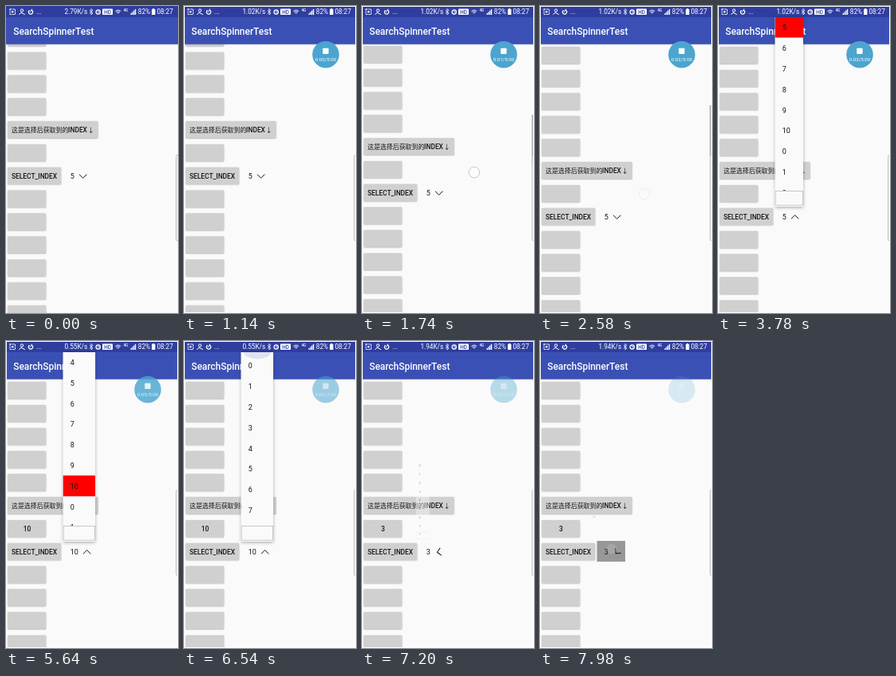
These frames come from a looping animation (216 px wide and 384 px high, 8 s). An HTML page with a canvas:

```html
<!DOCTYPE html>
<html lang="en">
<head>
<meta charset="utf-8">
<title>Spinner demo</title>
<style>
  html, body { margin: 0; width: 100%; height: 100%; overflow: hidden; background: #fafafa; }
  canvas { display: block; width: 216px; height: 384px; }
</style>
</head>
<body>
<canvas id="stage"></canvas>
<script>
const W = 216, H = 384, LOOP = 8000, OPEN_MS = 400;
const canvas = document.getElementById('stage');
const ctx = canvas.getContext('2d');
const ratio = Math.max(1, window.devicePixelRatio || 1);
canvas.width = W * ratio;
canvas.height = H * ratio;

const SANS = 'Roboto, "Noto Sans CJK SC", "Noto Sans CJK", sans-serif';
const CJK = '"Noto Sans CJK SC", "Noto Sans CJK", sans-serif';
const INK = '#141414';
const ROW = 28.8, ITEM = 25.8, FIRST_ITEM = 31;

// [time, value] steps, linear in between
const pageScroll = [[1260, 51], [1500, 42], [1740, 30], [2100, 12], [2440, 0]];
const dragX = [[1260, 147], [1740, 141], [2440, 131]];
const dragY = [[1260, 187], [1740, 208], [2440, 235]];
const dragAlpha = [[1180, 0], [1260, 1], [2440, 1], [2640, 0]];
const barAlpha = [[1240, 0], [1300, 1], [2700, 1], [2950, 0]];
const recorderAlpha = [[5160, 1], [5640, .82], [6540, .53], [7980, .2]];
const glowAlpha = [[6240, 0], [6400, 1], [6560, .9], [6860, 0]];
const secondList = [[5200, 262], [5400, 195], [5640, 107.7], [5900, 45], [6240, 0]];

// every time the drop-down is shown
const sessions = [
  { open: 2990, close: 3800, value: 5, pick: 10, scroll: () => 5 * ITEM + 4 },
  { open: 4704, close: 6980, value: 10, pick: 3, scroll: t => at(secondList, t) },
  { open: 7892, close: 9000, value: 3, pick: 3, scroll: () => 3 * ITEM + 4 }
];

const clamp = x => Math.min(1, Math.max(0, x));
const smooth = x => (1 - Math.cos(Math.PI * x)) / 2;

function at(steps, t) {
  if (t <= steps[0][0]) return steps[0][1];
  for (let i = 1; i < steps.length; i++) {
    const [t0, a] = steps[i - 1], [t1, b] = steps[i];
    if (t < t1) return a + (b - a) * (t - t0) / (t1 - t0);
  }
  return steps[steps.length - 1][1];
}

function layer(draw, alpha = 1) {
  if (alpha <= 0) return;
  ctx.save();
  ctx.globalAlpha *= alpha;
  draw();
  ctx.restore();
}

function text(str, x, y, size, color, { weight = 400, align = 'left', family = SANS } = {}) {
  ctx.font = `${weight} ${size}px ${family}`;
  ctx.textAlign = align;
  ctx.textBaseline = 'alphabetic';
  ctx.fillStyle = color;
  ctx.fillText(str, x, y);
}

function rect(x, y, w, h, color, r = 0) {
  ctx.fillStyle = color;
  ctx.beginPath();
  ctx.roundRect(x, y, w, h, r);
  ctx.fill();
}

function disc(x, y, r, color) {
  ctx.fillStyle = color;
  ctx.beginPath();
  ctx.arc(x, y, r, 0, 7);
  ctx.fill();
}

function line(points, color = '#fff', width = 1) {
  ctx.strokeStyle = color;
  ctx.lineWidth = width;
  ctx.beginPath();
  points.forEach(([x, y]) => ctx.lineTo(x, y));
  ctx.stroke();
}

function ring(x, y, r, color = '#fff', width = 1, from = 0, to = 7) {
  ctx.strokeStyle = color;
  ctx.lineWidth = width;
  ctx.beginPath();
  ctx.arc(x, y, r, from, to);
  ctx.stroke();
}

function shadow(blur, dy, opacity) {
  ctx.shadowBlur = blur * ratio;
  ctx.shadowOffsetY = dy * ratio;
  ctx.shadowColor = `rgba(0,0,0,${opacity})`;
}

function button(y, w = 48) {
  layer(() => {
    shadow(1.6, .5, .28);
    rect(2.2, y - 10.8, w, 21.4, '#d0d0d0', 1.2);
  });
}

function textWidth(value) {
  ctx.font = `400 9px ${SANS}`;
  return ctx.measureText(value).width;
}

function spinner(y, value, turn, pressed) {
  const w = textWidth(value);
  if (pressed) rect(71.5, y - 13.5, w + 30.5, 26, '#979797');
  text(value, 80.8, y + 3.3, 9, INK);
  layer(() => {
    ctx.translate(81 + w + 10.6, y + .4);
    ctx.rotate(Math.PI * turn);
    line([[-4.7, -2.3], [0, 2.3], [4.7, -2.3]], INK);
  });
}

function rows(t, state) {
  const top = 61.9 - at(pageScroll, t);
  for (let i = 0; i < 14; i++) {
    const y = top + i * ROW;
    const label = y + 3.3;
    button(y, i === 5 ? 113.4 : i === 7 ? 67 : 48);
    if (i === 5) {
      text('这是选择后获取到的', 7, label, 7.95, INK, { weight: 500, family: CJK });
      text('INDEX', 78.1, label, 8.4, INK, { weight: 500 });
      text('↓', 102.7, label, 8, INK, { weight: 500, family: CJK });
    }
    if (i === 6 && state.result !== '') {
      text(state.result, 26.5, label, 8.4, INK, { weight: 500, align: 'center' });
    }
    if (i === 7) {
      text('SELECT_INDEX', 7, label, 8.4, INK, { weight: 500 });
      spinner(y, state.value, state.turn, state.pressed);
    }
  }
}

function statusIcons() {
  ctx.lineCap = 'round';
  ctx.strokeStyle = '#fff';
  ctx.lineWidth = .9;
  ctx.setLineDash([2, 1.5]);
  ctx.strokeRect(5, 4, 6.5, 6.5);
  ctx.setLineDash([]);
  disc(8.2, 7.2, 1.3, '#fff');
  ring(20, 5.6, 1.7);
  line([[16.5, 10.5], [19, 8.3], [23.5, 10.5]]);
  ring(31, 7.5, 2.6, '#fff', 1.2, -1, 4);
  line([[30.5, 7.5], [32.5, 4]]);
  text('...', 38, 10, 8.2, '#fff');
  line([[105, 5.3], [109, 9], [107, 11], [107, 3.5], [109, 5.5], [105, 9.2]], '#fff', .8);
  ring(115.7, 7.4, 2.6, '#fff', 1.3);
  line([[115.7, 6], [115.7, 7.6], [117, 7.6]], '#fff', .7);
  rect(121, 3.5, 13, 7.5, '#fff', .8);
  text('HD', 127.5, 9.7, 6.3, '#303f9f', { weight: 500, align: 'center' });
  for (const r of [1.2, 3, 4.8]) ring(140.8, 9.8, r, '#fff', .9, 4, 5.4);
  text('4G', 147.5, 7.3, 4.6, '#fff', { weight: 500 });
  for (let i = 0; i < 4; i++) rect(156.5 + i * 1.8, 9 - i * 1.7, 1.3, 2 + i * 1.7, '#fff');
  rect(183, 4, 4.4, 7, '#fff', .5);
  rect(184.2, 3, 2, 1, '#fff');
}

function bars(t) {
  layer(() => {
    shadow(2, .6, .3);
    rect(0, 14, W, 33.7, '#3b50b4');
  });
  rect(0, 0, W, 14, '#2f3e9e');
  const speed = t < 1100 ? '2.79' : t < 4100 ? '1.02' : t < 7100 ? '0.55' : '1.94';
  text(speed + 'K/s', 102.2, 10.1, 8.2, '#fff', { align: 'right' });
  layer(statusIcons);
  text('82%', 165.8, 10.1, 8.2, '#fff');
  text('08:27', 209.8, 10.1, 8.2, '#fff', { align: 'right' });
  text('SearchSpinnerTest', 9.2, 35.8, 11.95, '#fff', { weight: 500 });
}

function edgeHandle() {
  rect(213.6, 186, 6, 108, '#f0f0f0', 2.5);
  ctx.strokeStyle = '#a8a8a8';
  ctx.lineWidth = .7;
  ctx.stroke();
}

function recorder(t) {
  if (t < 120) return;
  layer(() => {
    disc(178, 60.7, 16.8, '#4ba5cf');
    rect(174.2, 52.8, 7.4, 7.2, '#fff', .8);
    const seconds = Math.max(0, Math.floor((t - 350) / 1000));
    text(`0:0${seconds}/5:00`, 178, 68.8, 6.2, '#fff', { align: 'center' });
  }, at(recorderAlpha, t));
}

function popup(t, state) {
  const { session, shown } = state;
  if (!session || shown <= 0) return;
  const w = textWidth(session.value) + 30.5;
  layer(() => {
    ctx.translate(65, 245.5);
    ctx.scale(shown, shown);
    ctx.translate(-65, -245.5);
    layer(() => {
      // the elevation shadow only builds up as the panel becomes opaque
      shadow(4 * shown, .6 * shown, .35 * shown ** 4);
      rect(71.5, 14, w, 237, '#fafafa');
    });
    ctx.beginPath();
    ctx.rect(71.5, 14, w, 237);
    ctx.clip();
    const offset = session.scroll(t);
    for (let i = 0; i < 30; i++) {
      const y = FIRST_ITEM + i * ITEM - offset;
      if (y < 0 || y > 246) continue;
      if (i === session.value) rect(71.5, y - 13.2, w, ITEM, '#f00');
      text(i % 11, 80.8, y + 3.3, 9, INK);
    }
    layer(() => {
      ctx.fillStyle = '#dde1ee';
      ctx.beginPath();
      ctx.ellipse(92, 14, 17, 8.5, 0, 0, 7);
      ctx.fill();
    }, at(glowAlpha, t));
    rect(71.5, 231, w, 20, '#fafafa');
    ctx.strokeStyle = '#bbb';
    ctx.lineWidth = .8;
    ctx.strokeRect(72.2, 231.4, w - 1.2, 17.8);
  }, shown);
}

function touches(t) {
  layer(() => {
    disc(at(dragX, t), at(dragY, t), 6.8, 'rgba(255,255,255,.5)');
    ring(at(dragX, t), at(dragY, t), 6.8, '#bcc0cb', .9);
  }, at(dragAlpha, t));
  for (const { open } of sessions) {
    const alpha = at([[open - 120, 0], [open - 60, 1], [open + 60, .8], [open + 140, 0]], t);
    layer(() => disc(90, 260, 6.5, 'rgba(200,200,205,.55)'), alpha);
  }
}

function stateAt(t) {
  const state = { value: 5, result: '', turn: 0, shown: 0, pressed: false, session: null };
  for (const s of sessions) {
    if (t < s.open - 60) break;
    const closing = t >= s.close;
    const progress = closing ? 1 - clamp((t - s.close) / OPEN_MS) : clamp((t - s.open) / OPEN_MS);
    Object.assign(state, {
      session: s, turn: progress, shown: smooth(progress), pressed: t < s.open + 310
    });
    if (closing) state.value = state.result = s.pick;
  }
  return state;
}

function draw(t) {
  const state = stateAt(t);
  ctx.setTransform(ratio, 0, 0, ratio, 0, 0);
  rect(0, 0, W, H, '#fafafa');
  rows(t, state);
  layer(() => rect(213.2, 124 + .4 * at(pageScroll, t), 1.4, 63, '#a2a2a2'), at(barAlpha, t));
  bars(t);
  edgeHandle();
  popup(t, state);
  recorder(t);
  touches(t);
  if (t >= 60) {
    ctx.strokeStyle = '#fff';
    ctx.lineWidth = 1;
    ctx.strokeRect(.5, .5, W - 1, H - 1);
  }
}

const start = performance.now();
function tick() {
  draw((performance.now() - start) % LOOP);
  requestAnimationFrame(tick);
}
tick();
</script>
</body>
</html>
```
